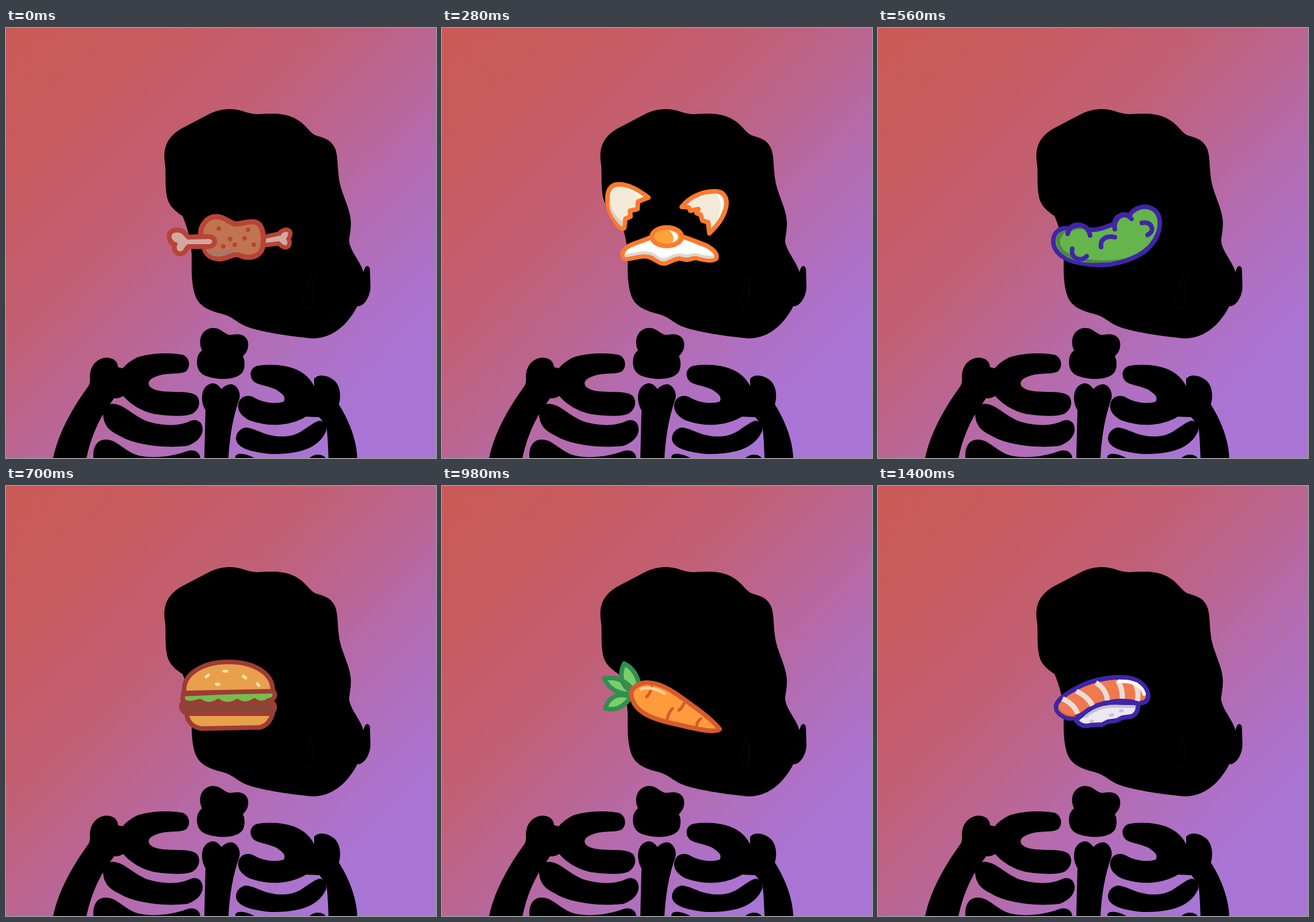
Write an HTML page that moves like this. It is 748 px wide and 748 px high and loops after 1.54 s.

```html
<!DOCTYPE html>
<html lang="en">
<head>
<meta charset="utf-8">
<title>Skeleton snacks</title>
<style>
html, body { margin: 0; width: 100%; height: 100%; overflow: hidden; background: #bf6182; }
svg { display: block; width: 100vw; height: 100vh; }
#foods > g { display: none; stroke-width: 8; stroke-linejoin: round; stroke-linecap: round; }
#foods > g.on { display: inline; }
.flat { stroke: none; }
.line { fill: none; }
</style>
</head>
<body>
<svg viewBox="0 0 748 748">
<defs>
  <linearGradient id="sky" gradientUnits="userSpaceOnUse" x1="0" y1="0" x2="748" y2="748">
    <stop offset="0" stop-color="#ca5a56"/>
    <stop offset=".18" stop-color="#c75b5f"/>
    <stop offset=".36" stop-color="#c25f73"/>
    <stop offset=".5" stop-color="#bb6590"/>
    <stop offset=".62" stop-color="#b46bae"/>
    <stop offset=".75" stop-color="#ae71c7"/>
    <stop offset=".85" stop-color="#a975d5"/>
    <stop offset="1" stop-color="#a976d7"/>
  </linearGradient>
</defs>
<rect width="748" height="748" fill="url(#sky)"/>

<g id="skeleton">
  <!-- skull -->
  <path d="M390 141C410 141 420 150 438 150C460 149 480 147 500 156C520 165 526 180 537 186C550 191 562 192 570 205C578 217 576 237 579 260C582 287 599 312 600 338C600 355 597 362 597 372C600 390 616 405 622 425C624 412 631 411 633 419L634 450C634 465 624 485 611 484C600 506 575 540 533 540C500 537 440 529 415 518C400 511 395 503 378 498C355 492 335 486 328 462C322 440 323 420 323 395C322 370 315 345 307 327C290 316 281 306 279 288C276 265 279 250 276 232C273 205 283 188 305 175L345 154C360 146 372 141 390 141Z"/>
  <path d="M528 434C526 452 521 464 516 476M530 430C535 448 536 468 532 486M538 430L540 438M518 487H530" fill="none" stroke="#0c0c0c"/>
  <!-- neck and sternum -->
  <path d="M362 522C374 522 380 533 390 534C402 532 412 531 419 541C424 551 421 563 412 571C417 580 415 592 412 598C402 613 370 613 350 606C335 602 330 588 333 573C335 566 339 562 341 561C336 550 337 540 341 533C346 525 354 521 362 522Z"/>
  <path d="M359 618C368 618 372 625 375 628C380 622 388 619 394 620C406 624 409 640 405 648C397 672 390 700 387 748H345L347 665C338 650 337 622 359 618Z"/>
  <!-- left side -->
  <path d="M195 590C194 577 182 572 170 574C153 578 146 592 146 608Q147 616 144 622C120 655 92 700 82 748H140C147 715 158 690 170 670L188 644Q197 645 204 640C216 655 240 669 262 672C290 676 315 676 326 670C337 662 339 649 332 640C320 629 285 636 262 630C243 624 244 612 262 606C280 599 300 603 312 598C322 590 320 575 309 569C290 564 250 565 228 573Q212 581 203 592Z"/>
  <path d="M183 654C203 652 220 674 245 684C270 692 300 694 322 683C335 679 343 688 342 700C341 712 330 722 315 727C280 731 225 727 195 708C178 700 168 688 169 668C171 658 176 655 183 654Z"/>
  <path d="M172 716C192 714 207 738 232 744C260 750 295 744 315 736C328 732 337 738 338 748H152C151 730 157 717 172 716Z"/>
  <!-- right side -->
  <path d="M436 588C460 583 500 586 520 603Q530 611 536 623L536 610C545 600 562 605 572 614C582 624 583 642 579 655C595 680 610 715 611 748H561C560 720 559 702 557 692L545 677L522 676C495 692 460 695 425 683C410 677 402 665 404 655C406 642 418 637 430 642C445 651 465 655 483 650C488 641 480 636 470 629C455 622 438 621 431 615C422 606 424 592 436 588Z"/>
  <path d="M416 695C435 695 452 714 490 710C515 707 525 690 545 683C558 684 560 697 555 705C540 735 500 742 460 741C430 738 402 732 400 715C400 703 408 697 416 695Z"/>
  <path d="M399 748C398 738 415 739 432 748ZM528 748C535 741 550 740 556 748Z"/>
</g>

<g id="foods">
  <!-- meat on a bone -->
  <g stroke="#b84437" fill="#d1a9a0">
    <path stroke-width="15" d="M449 367L478 361C480 355 490 352 491 357C491 362 488 365 487 367C491 372 490 378 486 378C480 377 478 372 475 371L450 374Z"/>
    <path class="flat" d="M449 367L478 361C480 355 490 352 491 357C491 362 488 365 487 367C491 372 490 378 486 378C480 377 478 372 475 371L450 374Z"/>
    <path fill="#c07450" stroke-width="9" d="M340 366C334 345 350 328 366 328C380 328 388 339 400 341C415 340 431 332 441 342C449 352 450 375 444 388C436 400 420 401 408 396C400 392 392 396 382 400C365 405 349 398 345 384Z"/>
    <path class="flat" fill="#a87868" d="M347 383Q364 391 382 386Q396 384 405 390Q394 390 382 395C366 401 350 396 347 383Z"/>
    <path stroke-width="17" d="M288 362C288 355 300 354 306 358C310 362 313 366 316 368L352 367C361 367 361 375 353 376L316 376C312 378 310 384 307 387C302 391 296 387 297 380L299 374C292 372 288 368 288 362Z"/>
    <path class="flat" d="M288 362C288 355 300 354 306 358C310 362 313 366 316 368L352 367C361 367 361 375 353 376L316 376C312 378 310 384 307 387C302 391 296 387 297 380L299 374C292 372 288 368 288 362Z"/>
    <path class="line" stroke-width="8" d="M370 349h0M421 351h0M390 367h0M415 366h0M378 380h0M398 377h0M431 377h0"/>
  </g>

  <!-- hot dog -->
  <g stroke="#b5482f" fill="#eeb45f">
    <path d="M293 372C297 349 330 337 370 326C408 312 448 295 474 304C496 316 494 351 472 371C441 398 382 421 332 424C305 423 288 400 293 372Z"/>
    <path fill="#dd6848" d="M289 381C285 362 307 352 341 347C388 338 426 320 464 312C485 308 499 321 489 337C473 354 430 371 389 381C350 391 302 403 289 381Z"/>
    <path class="line" stroke="#ffd34f" stroke-width="7" d="M316 374Q330 355 344 371T376 361T407 353T437 340T466 328"/>
  </g>

  <!-- fried egg and shells -->
  <g stroke="#fb7b2f" fill="#f4eada">
    <path d="M306 272C325 271 345 284 359 295L341 302L340 315L327 318L328 328L319 332L317 348C313 351 307 346 302 337C288 318 285 295 290 283C294 275 300 272 306 272Z"/>
    <path class="flat" fill="#d9d0c0" d="M291 300C294 318 304 330 315 338L314 346C304 340 288 318 291 300Z"/>
    <path class="flat" fill="#fff" d="M312 276Q333 279 351 294L343 294Q328 280 312 276Z"/>
    <path d="M417 311C430 295 450 284 475 284C492 284 497 298 494 312C490 330 478 345 465 357L463 338L453 335L450 325L443 322L446 315L432 318L429 312Z"/>
    <path class="flat" fill="#fff" d="M476 288C494 289 494 311 480 333C486 313 488 300 476 288Z"/>
    <path fill="#fff" d="M314 391C320 375 345 374 365 363L418 363C433 367 447 374 459 378C472 385 480 393 477 401C470 407 455 403 443 400C435 399 430 406 420 402C408 398 400 406 390 409C377 412 370 399 355 397C340 396 322 406 315 399Z"/>
    <path class="line" stroke="#ddd7d0" stroke-width="5" d="M320 396C335 394 348 389 361 392C372 394 378 405 387 403C400 399 407 392 420 396C431 399 434 391 446 395Q460 400 471 398"/>
    <ellipse cx="391" cy="363" rx="26" ry="16" fill="#ffa23c"/>
    <path class="flat" fill="#fff" d="M395 352C412 354 416 369 401 373Q406 361 395 352Z"/>
  </g>

  <!-- steak -->
  <g stroke="#bf3a50" fill="#ff8787">
    <path d="M385 302C420 300 470 320 486 342C495 360 490 390 480 408C470 422 430 418 400 416C365 413 340 398 320 385C303 377 295 370 299 353C306 335 320 318 335 315C350 315 360 317 370 310C376 306 380 302 385 302Z"/>
    <path class="flat" fill="#f86464" d="M388 307C420 305 450 316 464 325C440 316 410 313 385 317L340 322Q326 324 317 333Q324 321 337 319C360 321 368 314 388 307Z"/>
    <path class="flat" fill="#fff7c4" d="M474 335C491 347 490 372 482 386L474 387C484 367 482 352 474 335Z"/>
    <path class="flat" fill="#f9bdc9" d="M430 392Q462 394 484 386Q482 404 472 412Q435 417 406 409Q424 402 430 392Z"/>
    <path class="flat" fill="#ba5260" d="M428 413Q442 407 454 401Q466 399 465 412Q449 417 428 413Z"/>
    <path class="line" stroke="#ee4e5d" stroke-width="7" d="M327 331C347 345 366 365 376 381M359 325C381 344 398 365 405 386M391 321C416 341 432 366 440 388M318 345Q360 331 413 323M336 358Q375 349 417 347M352 379C397 393 444 398 482 383"/>
    <path class="line" d="M304 348Q316 367 351 377M364 384L370 386"/>
    <ellipse cx="440" cy="335" rx="18" ry="9" fill="#f9c1cb" stroke-width="7" transform="rotate(25 440 335)"/>
    <path class="line" stroke="#ba4858" stroke-width="4" d="M365 345h0M403 358h0M412 370h0M384 401h0M412 399h0M448 362l3 1M464 357h1M466 375h0M382 372h0"/>
  </g>

  <!-- brain -->
  <g stroke="#4025a8" fill="#65b54c">
    <path d="M305 372C304 355 318 346 333 349C342 339 357 341 365 350C380 354 395 346 411 341C412 326 428 321 437 327C445 312 465 306 480 316C495 328 492 350 482 368C468 392 440 405 405 411C370 415 330 408 315 393C309 387 305 380 305 372Z"/>
    <path class="flat" fill="#4e8844" d="M310 371C309 360 317 352 329 353C312 364 313 381 330 391C356 405 399 408 429 400C396 411 353 413 327 398Q311 386 310 371ZM337 354Q347 342 359 350Q347 348 337 354Z"/>
    <path class="line" d="M330 358C332 345 352 337 364 350Q368 355 369 361M412 350C408 335 425 315 441 332M388 381C386 366 398 361 412 364M459 339C475 335 484 352 469 360M338 384C334 400 352 408 363 397"/>
  </g>

  <!-- burger -->
  <g stroke="#9d3c35" fill="#e9a04d">
    <path d="M315 389L462 382C469 395 458 417 441 420L340 422C321 419 312 405 315 389Z"/>
    <path fill="#874638" d="M311 374H460C471 379 469 394 458 396H315C303 391 302 378 311 374Z"/>
    <path fill="#75bd4e" d="M308 362L463 355C472 362 467 372 457 373Q445 382 432 373Q417 384 402 374Q385 385 369 374Q352 385 337 374Q314 383 307 371Z"/>
    <path d="M310 360C306 325 345 306 387 306C432 306 465 326 464 357Z"/>
    <path class="line" stroke="#ffe4ae" stroke-width="5" d="M348 332l4 -3M379 322h5M413 331l4 3M366 345h4M437 344l3 3"/>
  </g>

  <!-- pineapple -->
  <g stroke="#3cbd78" fill="#8df2a0">
    <path d="M354 352C340 340 331 328 333 314C334 305 339 298 344 298C347 315 345 329 354 350Z"/>
    <path d="M347 357C320 351 304 331 304 308C321 315 336 330 347 357Z"/>
    <path d="M340 367C317 370 291 360 282 336C307 340 331 348 340 367Z"/>
    <path d="M344 371C325 393 304 398 286 400C294 378 316 368 344 371Z"/>
    <path d="M354 393Q336 408 319 416Q322 393 341 382Z"/>
    <g transform="rotate(20 399 377)" stroke="#e05a55">
      <ellipse cx="399" cy="377" rx="65" ry="42" fill="#ffc42c"/>
      <path class="line" stroke="#f7923a" stroke-width="4" d="M346 364Q379 365 401 412M363 347Q405 359 432 405M393 341Q431 353 455 385M346 389Q369 375 374 344M365 404Q405 387 411 342M401 413Q434 391 441 353M432 404Q451 389 454 369"/>
      <path class="line" stroke="#f7923a" d="M364 378h0M383 363h0M389 387h0M407 374h0M423 360h0M426 386h0M442 374h0M414 401h0M378 400h0" stroke-width="4"/>
      <path class="line" stroke="#fff0dc" stroke-width="5" d="M388 342C420 341 447 354 456 371"/>
      <path class="line" stroke="#d99a35" stroke-width="4" d="M345 390C355 407 382 416 408 413"/>
    </g>
  </g>

  <!-- carrot -->
  <g stroke="#d65a2b" fill="#ff9b3c">
    <path stroke="#348d50" fill="#79cf68" d="M331 358C309 347 309 325 317 309C334 317 342 333 344 354ZM329 362C306 363 289 351 282 335C303 330 323 340 335 359ZM329 367C313 388 299 391 284 387C289 368 306 358 329 367Z"/>
    <path d="M329 358C344 333 376 340 408 362C442 386 469 405 483 423C477 430 448 424 410 415C366 406 329 393 329 358Z"/>
    <path class="line" stroke-width="5" d="M365 349Q363 360 356 367M392 405Q394 394 401 387M421 378Q418 386 412 390M443 417Q444 409 450 405"/>
    <path class="line" stroke="#ffd29a" stroke-width="5" d="M346 353Q365 348 387 361"/>
  </g>

  <!-- pizza -->
  <g stroke="#4025a8" fill="#f9cf3a">
    <path fill="#f5d07c" d="M297 405C297 394 312 385 330 388L430 393L433 412C395 401 350 405 316 410Q299 413 297 405Z"/>
    <path d="M326 387C344 353 364 327 383 321C402 323 418 336 430 348C447 356 463 365 472 378C484 397 482 420 477 440C472 449 459 447 457 434C459 420 464 406 456 402C447 402 446 414 435 415C433 407 429 397 417 393C404 386 395 389 387 396C374 398 368 385 354 389C345 398 335 392 326 387Z"/>
    <path class="line" stroke="#fff" stroke-width="5" d="M407 338Q415 343 421 349M466 381Q478 403 472 432Q470 440 464 439"/>
    <path fill="#f4bb60" d="M297 403C299 369 326 322 358 310C374 305 386 311 383 320C355 332 336 361 326 386C315 389 303 396 297 403Z"/>
    <path class="line" stroke="#d6a354" d="M310 383Q319 350 334 334" stroke-width="7"/>
    <path class="flat" fill="#b782b0" d="M312 396L324 397L314 401Z"/>
    <ellipse class="flat" cx="361" cy="365" rx="17" ry="11" fill="#fa5265"/>
    <path fill="#f7b68e" stroke-width="6" d="M374 345C375 329 404 328 408 343C408 350 400 352 397 352L402 365C400 373 386 371 386 365L388 352Q376 351 374 345Z"/>
    <path class="line" stroke="#fff" stroke-width="4" d="M395 336Q403 339 403 345"/>
    <ellipse cx="440" cy="363" rx="23" ry="11" fill="#fa5265" stroke-width="6"/>
    <path class="line" stroke="#fff" stroke-width="4" d="M437 357Q453 356 458 362"/>
    <path class="line" stroke="#24a441" stroke-width="4" d="M380 379Q387 384 396 379M433 387Q438 395 444 391M461 390L464 394"/>
  </g>

  <!-- taco -->
  <g stroke="#a6532d" fill="#f8c957">
    <path d="M313 400C310 355 342 316 389 315C434 314 467 347 467 382Z"/>
    <path fill="#76bf51" d="M320 405C313 385 329 378 329 367C331 350 349 353 353 340C367 327 377 341 389 332C404 325 411 341 423 342C437 344 437 358 449 362C461 371 456 382 467 389Z"/>
    <path class="line" stroke="#e45343" stroke-width="10" d="M338 363l7 -7M374 340h9M414 346l8 5M445 369l5 6"/>
    <path d="M317 409C317 374 346 349 388 347C429 347 461 367 468 396C466 410 444 415 409 417C369 421 325 421 317 409Z"/>
    <path class="line" stroke="#dda046" stroke-width="5" d="M350 386h0M376 369h0M391 398h0M421 380h0M440 400h0M355 406h0"/>
  </g>

  <!-- sushi -->
  <g stroke="#4025a8" fill="#f07a50">
    <path fill="#ebe8f1" d="M344 407C375 380 410 374 452 378C453 391 448 399 440 401L425 403L415 408L400 410L390 415L370 416Q354 421 344 407Z"/>
    <path class="line" stroke="#c8c0d2" stroke-width="5" d="M361 401Q383 382 414 383L446 384M371 409h2M404 399l4 -1M422 391h3"/>
    <path d="M310 387C307 375 325 362 350 349C380 334 420 329 445 336C462 342 470 355 470 366C468 378 458 379 445 376C420 371 385 376 365 390C350 402 335 408 324 402C316 398 311 394 310 387Z"/>
    <path class="line" stroke="#e9dcd7" stroke-linecap="butt" stroke-width="9" d="M321 370Q342 380 347 396M345 357Q365 366 373 382M379 342Q397 353 399 373M417 338Q426 353 425 370M447 343Q455 358 451 374"/>
    <path class="line" stroke="#fff" stroke-width="6" d="M419 340C442 338 459 346 463 362"/>
    <path class="line" stroke="#d9693f" stroke-width="3" d="M315 389Q326 401 341 400"/>
  </g>
</g>
</svg>
<script>
const STEP = 140;
const foods = [...document.querySelectorAll('#foods > g')];
const start = performance.now();
let shown = -1;

function draw(now) {
  const next = Math.floor(Math.max(0, now - start) / STEP) % foods.length;
  if (next !== shown) {
    foods.forEach((food, i) => food.classList.toggle('on', i === next));
    shown = next;
  }
  requestAnimationFrame(draw);
}
draw(start);
</script>
</body>
</html>
```
